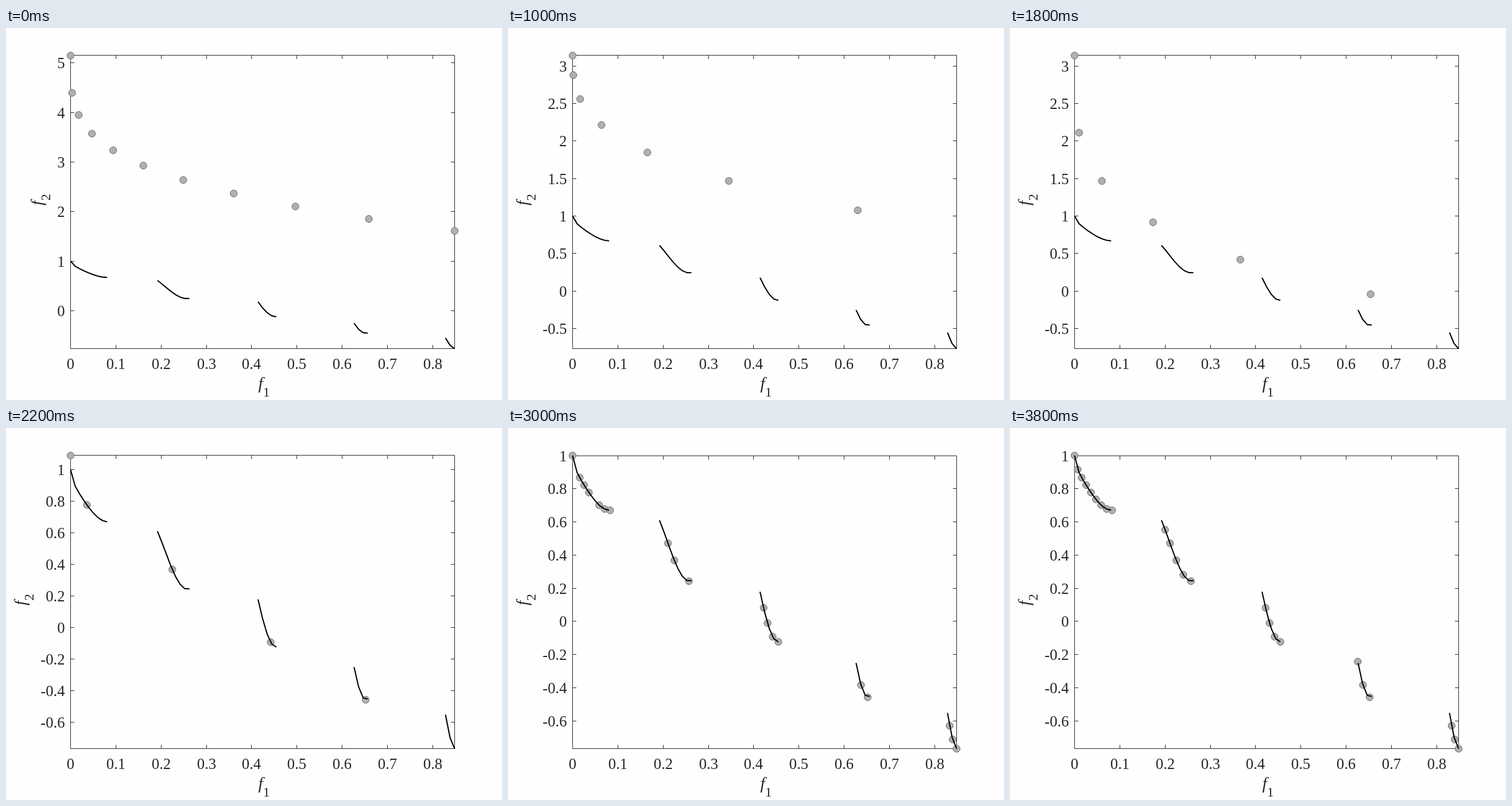
Recreate the animation shown at these times as an HTML page with a canvas. Size 864 by 648 pixels, loop 4000 ms.

```html
<!DOCTYPE html>
<html lang="en">
<head>
<meta charset="utf-8">
<title>Front approximation</title>
<style>
  html, body { margin: 0; width: 100%; height: 100%; overflow: hidden; background: #fefefe; }
  canvas { display: block; }
</style>
</head>
<body>
<canvas id="stage" width="864" height="648"></canvas>
<script>
const ctx = document.getElementById('stage').getContext('2d');
const LOOP = 4000;
const GRID = 99;
const INK = '#262626';
const SERIF = '"Liberation Serif", "Times New Roman", serif';
const LABEL_SIZE = 26.67;
const box = { left: 112.5, right: 781.5, top: 48, bottom: 558.7 };

const frontCurve = x => 1 - Math.sqrt(x) - x * Math.sin(10 * Math.PI * x);
const X_MAX = 84 / GRID;
const Y_MIN = frontCurve(X_MAX);

// Vertical axis settings, each valid from its start time.
const axes = [
  { from: 0, max: 5.15, step: 1, frameTop: 47.5 },
  { from: 600, max: 3.14, step: 0.5, frameTop: 47.5 },
  { from: 2200, max: 1.09, step: 0.2, frameTop: 47.5 },
  { from: 3000, max: 1, step: 0.2, frameTop: 48.5 }
];

// Early generations fall from the top left corner to (endX, endY).
// spread crowds the dots to the left, bend shapes the fall.
const steep = { endX: 0.63, endY: 1.077, spread: 3.3, bend: 0.35 };
const generations = [
  { from: 0, count: 11, endX: X_MAX, endY: 1.61, spread: 2.4, bend: 0.28 },
  { from: 600, count: 7, endX: 0.63, endY: 1.077, spread: 0.8, bend: 1.3 },
  { from: 800, count: 6, ...steep },
  { from: 1000, count: 7, ...steep },
  { from: 1400, count: 10, ...steep },
  { from: 1600, count: 4, endX: 0.443, endY: 0.559, spread: 2.6, bend: 0.27 },
  { from: 1800, count: 6, endX: 0.654, endY: -0.042, spread: 2.6, bend: 0.27 },
  { from: 2200, count: 1 }
];

// Stretches of the front that the dots settle on.
const stretches = [
  { first: 0, last: 0.083, count: 9 },
  { first: 0.2, last: 0.257, count: 5 },
  { first: 0.422, last: 0.4546, count: 4 },
  { first: 0.6257, last: 0.652, count: 3 },
  { first: 0.833, last: X_MAX, count: 3 }
];

const toX = x => box.left + x / X_MAX * (box.right - box.left);
const toY = (y, max) => box.bottom - (y - Y_MIN) / (max - Y_MIN) * (box.bottom - box.top);
const crisp = v => Math.floor(v) + 0.5;
const current = (list, time) => list.findLast(item => time >= item.from);

// Long stretches get every second dot first; the gaps fill in later.
function settleDots() {
  const dots = [];
  let early = 2, late = 0;
  for (const { first, last, count } of stretches) {
    for (let i = 0; i < count; i++) {
      const x = first + (last - first) * (i / (count - 1)) ** 1.2;
      if (x === 0) continue;
      let from;
      if (i > 0 && (i % 2 === 0 || count < 5)) {
        from = 2200 + 200 * (early++ % 3);
      } else {
        from = late % 2 ? 3000 : late % 4 ? 3400 : 3800;
        late++;
      }
      dots.push({ x, y: frontCurve(x), from });
    }
  }
  return dots;
}
const settled = settleDots();

// Grid points lower than everything to their left, grouped into unbroken pieces.
function findFront() {
  const pieces = [];
  let lowest = Infinity, previous = -2;
  for (let i = 0; i <= X_MAX * GRID; i++) {
    const x = i / GRID, y = frontCurve(x);
    if (y >= lowest) continue;
    if (i > previous + 1) pieces.push([]);
    pieces.at(-1).push([x, y]);
    lowest = y;
    previous = i;
  }
  return pieces;
}
const front = findFront();

function line(...points) {
  ctx.beginPath();
  points.forEach(([x, y]) => ctx.lineTo(x, y));
  ctx.stroke();
}

function text(value, x, y, align, size = LABEL_SIZE, style = '') {
  ctx.font = `${style} ${size}px ${SERIF}`;
  ctx.textAlign = align;
  ctx.fillText(value, x, y);
  return ctx.measureText(value).width;
}

function axisTitle(index, x, y, angle) {
  ctx.save();
  ctx.translate(x, y);
  ctx.rotate(angle);
  text('f', 0, 0, 'left', 29.3, 'italic');
  text(index, 8.3, 13, 'left', 23.5);
  ctx.restore();
}

function drawAxes({ max, step, frameTop }) {
  const { left, right } = box;
  const frameBottom = crisp(box.bottom);
  const tick = 6.5;
  ctx.strokeStyle = ctx.fillStyle = INK;
  ctx.lineWidth = 1;
  ctx.strokeRect(left, frameTop, right - left, frameBottom - frameTop);

  for (let i = 0; i <= 8; i++) {
    const x = crisp(toX(i / 10));
    line([x, frameBottom], [x, frameBottom - tick]);
    line([x, frameTop], [x, frameTop + tick]);
    text(i / 10, x, 594, 'center');
  }
  let labelWidth = 0;
  for (let i = Math.ceil(Y_MIN / step); i * step <= max; i++) {
    const y = crisp(toY(i * step, max));
    line([left, y], [left + tick, y]);
    line([right, y], [right - tick, y]);
    const width = text(+(i * step).toFixed(1), 102.5, y + 9, 'right');
    labelWidth = Math.max(labelWidth, width);
  }
  axisTitle(1, 439.5, 629, 0);
  axisTitle(2, 77.5 - labelWidth, 309, -Math.PI / 2);
}

function drawDots(time, max) {
  ctx.fillStyle = '#b0b0b0';
  ctx.strokeStyle = '#686868';
  ctx.lineWidth = 1;
  const dot = (x, y) => {
    ctx.beginPath();
    ctx.arc(toX(x), toY(y, max), 6.1, 0, 2 * Math.PI);
    ctx.fill();
    ctx.stroke();
  };
  dot(0, max);
  const { count, endX, endY, spread, bend } = current(generations, time);
  for (let i = 1; i < count; i++) {
    const u = (i / (count - 1)) ** spread;
    dot(endX * u, max + (endY - max) * u ** bend);
  }
  for (const { x, y, from } of settled) if (time >= from) dot(x, y);
}

function drawFront(max) {
  ctx.strokeStyle = '#000';
  ctx.lineWidth = 2.1;
  ctx.lineJoin = 'round';
  for (const piece of front) line(...piece.map(([x, y]) => [toX(x), toY(y, max)]));
}

function render() {
  const time = performance.now() % LOOP;
  const axis = current(axes, time);
  ctx.fillStyle = '#fefefe';
  ctx.fillRect(0, 0, 864, 648);
  drawAxes(axis);
  drawDots(time, axis.max);
  drawFront(axis.max);
  requestAnimationFrame(render);
}
render();
</script>
</body>
</html>
```
